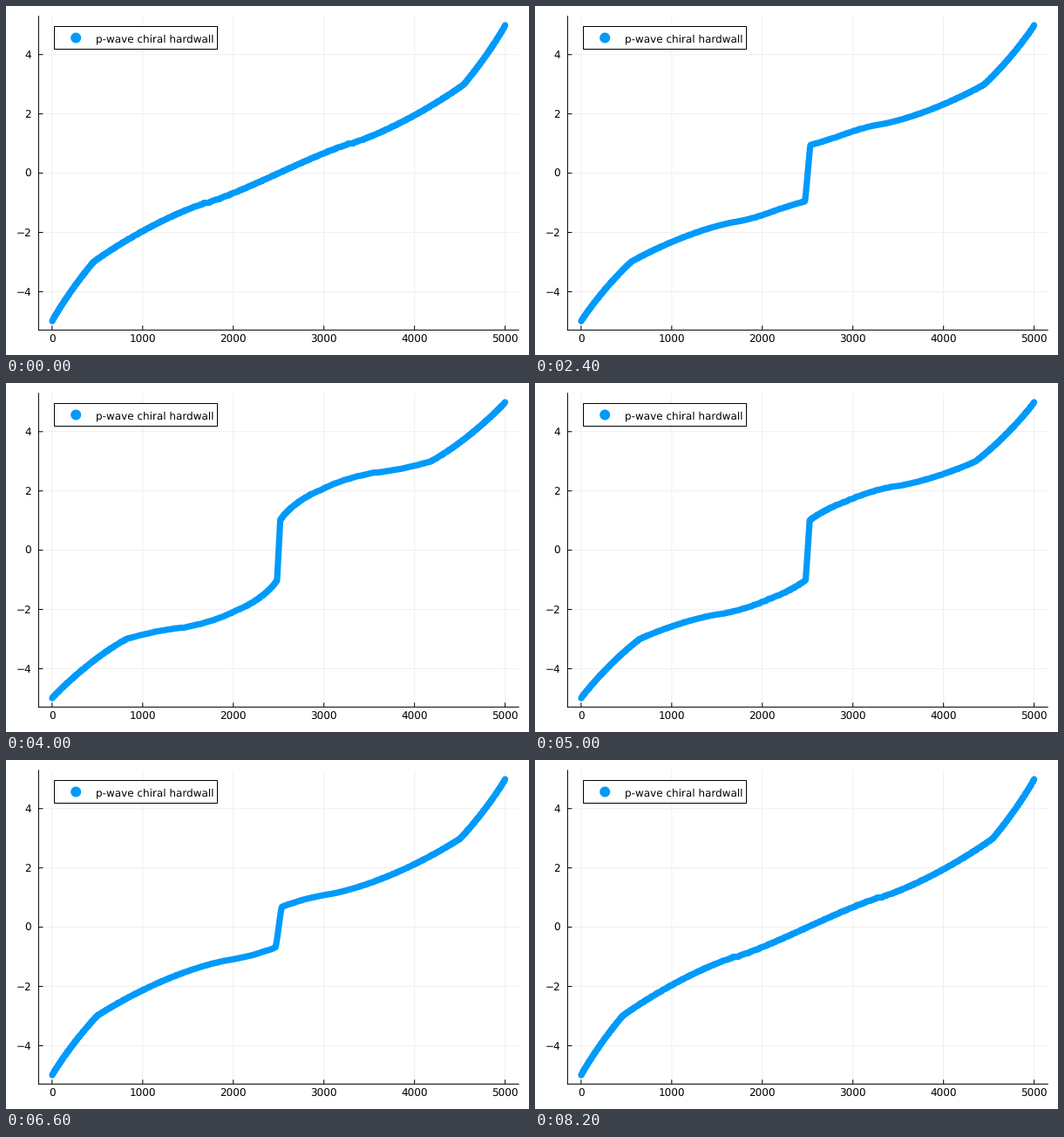
A matplotlib script for the animation above (8400 ms loop, 600 by 400 pixels).

```python
import numpy as np
import matplotlib.pyplot as plt
from matplotlib.animation import FuncAnimation
from matplotlib.patches import Circle, Rectangle

# Spectrum of a chiral p-wave superconductor on an open N x N lattice,
# with the pairing ramped up from zero and back down again.
N, MU = 50, 1.0
STEPS, GAP_STEP = 20, 0.1
BLUE = "#009afa"
W, H, DPI = 600, 400, 100
PX = 72 / DPI

plt.rcParams["font.family"] = "DejaVu Sans"
plt.rcParams["font.size"] = 12 * PX
plt.rcParams["text.hinting"] = "no_hinting"
plt.rcParams["path.snap"] = False

# Sine modes of the open chain; the hop operator links odd and even modes only.
n = np.arange(1, N + 1)
modes = np.sqrt(2 / (N + 1)) * np.sin(np.pi * np.outer(n, n) / (N + 1))
hop = (np.eye(N, k=1) - np.eye(N, k=-1)) / 2
link = (modes.T @ hop @ modes)[::2, 1::2]
cos_k = np.cos(np.pi * n / (N + 1))
cos_odd, cos_even = cos_k[::2], cos_k[1::2]
M = N // 2


def energy(a, b):
    return 2 * (a + b) + MU


def pair_rows(tensor, cosines, sign):
    """Combine mode pairs (i, j) and (j, i) with the given exchange sign."""
    i, j = np.triu_indices(M, 0 if sign > 0 else 1)
    scale = np.where(i == j, np.sqrt(0.5), 1.0)[:, None, None]
    rows = scale * (tensor[i, j] + sign * tensor[j, i])
    return rows.reshape(len(i), M * M), energy(cosines[i], cosines[j])


def sector(sign):
    """Diagonal energies and pairing block of one rotation sector."""
    eye = np.eye(M)
    odd = -np.einsum("ai,jb->ijab", eye, link)
    even = np.einsum("ai,bj->ijab", link, eye)
    rows_o, e_o = pair_rows(odd, cos_odd, sign)
    rows_e, e_e = pair_rows(even, cos_even, -sign)
    holes = -energy(cos_odd[:, None], cos_even[None, :]).ravel()
    return np.concatenate([e_o, e_e, holes]), np.vstack([rows_o, rows_e])


sectors = [sector(1), sector(-1)]


def squared_levels(gap):
    levels = []
    for diag, block in sectors:
        ham = np.diag(diag).astype(np.float32)
        size = len(block)
        ham[:size, size:] = gap * block
        ham[size:, :size] = gap * block.T
        levels.append(np.linalg.eigvalsh(ham))
    return np.sort(np.concatenate(levels).astype(float) ** 2)


table = [squared_levels(GAP_STEP * s) for s in range(0, STEPS + 1, 2)]


def spectrum(step):
    """Sorted levels; odd steps are interpolated, as E^2 is linear in gap^2."""
    low = table[step // 2]
    if step % 2:
        t = (2 * step - 1) / (4 * step)
        low = (1 - t) * low + t * table[step // 2 + 1]
    positive = np.sqrt(low)
    return np.concatenate([-positive[::-1], positive])


fig = plt.figure(figsize=(W / DPI, H / DPI), dpi=DPI, facecolor="white")

left, right, top, bottom = 37.4, 588.2, 11.8, 371.4
ax = fig.add_axes([left / W, 1 - bottom / H,
                   (right - left) / W, (bottom - top) / H])
count = 2 * N * N
margin = 0.03 * (count - 1)
x_ticks, y_ticks = range(0, 5001, 1000), range(-4, 5, 2)
ax.set_xlim(1 - margin, count + margin)
ax.set_xticks(x_ticks)
ax.set_yticks(y_ticks)
ax.set_axisbelow(True)
ax.grid(color="#efefef", linewidth=PX)
ax.tick_params(length=0)
ax.tick_params(axis="x", pad=5.7 * PX)
ax.tick_params(axis="y", pad=8.2 * PX)
tick = dict(colors="black", linewidth=PX)
ax.vlines(x_ticks, 0, 5 / (bottom - top),
          transform=ax.get_xaxis_transform(), **tick)
ax.hlines(y_ticks, 0, 5 / (right - left),
          transform=ax.get_yaxis_transform(), **tick)
for side in ("top", "right"):
    ax.spines[side].set_visible(False)
for side in ("left", "bottom"):
    ax.spines[side].set_linewidth(PX)

# The dots overlap into a band, drawn as one round-ended stroke.
curve, = ax.plot([], [], color=BLUE, linewidth=7.2 * PX,
                 solid_capstyle="round", solid_joinstyle="round", zorder=3)

# Legend, in pixel coordinates
key = fig.add_axes([0, 0, 1, 1])
key.set_xlim(0, W)
key.set_ylim(H, 0)
key.axis("off")
key.add_patch(Rectangle((55.5, 23.5), 187, 26, facecolor="white",
                        edgecolor="black", linewidth=PX))
key.add_patch(Circle((80.2, 36.5), 6, facecolor=BLUE, linewidth=0))
key.text(103, 41, "p-wave chiral hardwall", va="baseline")

FRAMES = 2 * (STEPS + 1)
index = np.arange(1, count + 1)


def draw(frame):
    levels = spectrum(min(frame, FRAMES - 1 - frame))
    curve.set_data(index, levels)
    limit = 1.06 * levels[-1]
    ax.set_ylim(-limit, limit)
    return curve,


anim = FuncAnimation(fig, draw, frames=FRAMES, interval=200,
                     repeat=True, repeat_delay=0)
plt.show()
```
